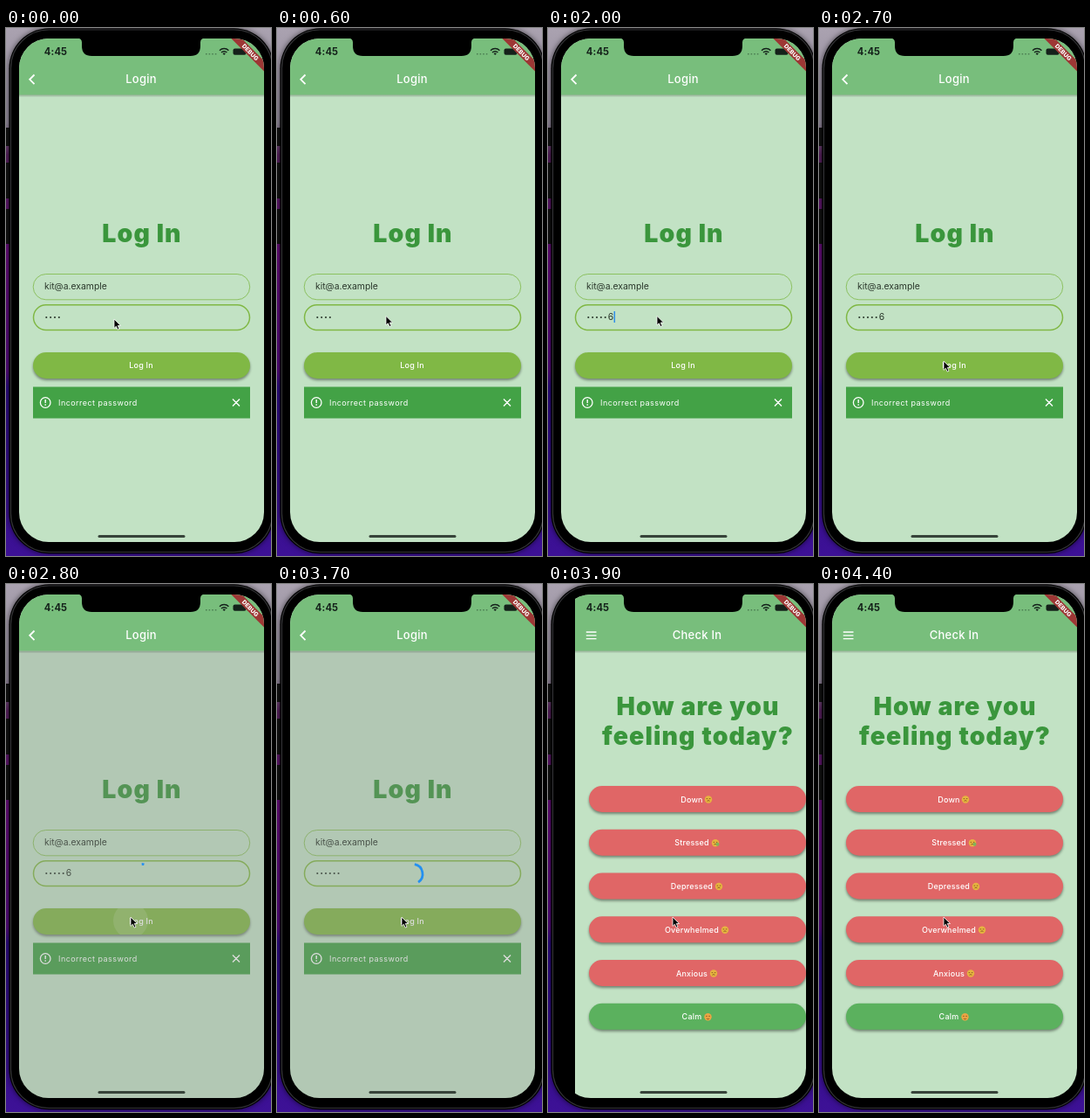
An HTML page that plays this animation: 304 px wide and 604 px high, repeating every 4500 ms.

```html
<!DOCTYPE html>
<html lang="en">
<head>
<meta charset="utf-8">
<title>Log in and check in</title>
<style>
html, body { margin: 0; width: 100%; height: 100%; overflow: hidden; background: #000; }
svg { display: block; width: 304px; height: 604px; font-family: Inter, Roboto, sans-serif; font-optical-sizing: none; }
.mid { text-anchor: middle; }
.white { fill: #fff; }
.line { fill: none; stroke: #fff; }
.bar { font-size: 13px; font-weight: 500; letter-spacing: .25px; }
.label { font-size: 9px; font-weight: 500; letter-spacing: .2px; }
.title { font-size: 28.5px; font-weight: 900; letter-spacing: 1.1px; fill: #3a963c; }
.input { font-size: 10.4px; fill: #2b382c; }
.lift { filter: drop-shadow(0 2px 1.8px rgba(0, 0, 0, .42)); }
.phone { filter: drop-shadow(0 0 3px rgba(0, 0, 0, .6)); }
</style>
</head>
<body>
<svg viewBox="0 0 304 604">
  <defs>
    <linearGradient id="wall" x2="0" y2="1">
      <stop offset="0" stop-color="#aaa2b0"/>
      <stop offset=".18" stop-color="#8f8798"/>
      <stop offset=".24" stop-color="#55205c"/>
      <stop offset=".42" stop-color="#640c78"/>
      <stop offset=".65" stop-color="#520a7c"/>
      <stop offset=".68" stop-color="#2c0b80"/>
      <stop offset="1" stop-color="#3d1196"/>
    </linearGradient>
    <linearGradient id="shade" x2="0" y2="1">
      <stop offset="0" stop-opacity=".22"/>
      <stop offset="1" stop-opacity="0"/>
    </linearGradient>
    <clipPath id="screen"><rect x="15" y="12" width="281" height="576" rx="34"/></clipPath>
    <clipPath id="pill"><rect x="31" y="371" width="249" height="30" rx="15"/></clipPath>
  </defs>

  <rect width="304" height="604" fill="url(#wall)"/>
  <path d="M0 114h4v21H0zM0 154h4v41H0zM0 207h4v40H0z" fill="#111"/>
  <rect class="phone" x="3.5" y=".3" width="304" height="601" rx="46"/>
  <rect x="5.5" y="2" width="300" height="597.5" rx="44" stroke="#333336" stroke-width="1.2"/>

  <g clip-path="url(#screen)">
    <g id="login">
      <rect x="15" y="12" width="281" height="576" fill="#c2e2c4"/>
      <text class="title mid" x="156" y="245">Log In</text>
      <rect x="31.2" y="281.5" width="248.5" height="29.3" rx="14.6" fill="none" stroke="#8cc160"/>
      <text class="input" x="44" y="299">kit@a.example</text>
      <rect x="31.5" y="316.7" width="248" height="28.8" rx="14.4" fill="none" stroke="#80b845" stroke-width="1.5"/>
      <g id="dots" fill="#2b382c"></g>
      <text class="input" id="digit" y="334"></text>
      <rect id="caret" y="324" width="1.5" height="13" fill="#2f8fe8"/>
      <rect class="lift" x="31" y="371" width="249" height="30" rx="15" fill="#80b845"/>
      <g clip-path="url(#pill)"><circle id="ripple" cx="143" cy="385" fill="#fff"/></g>
      <text class="label mid white" x="155" y="388.5">Log In</text>
      <rect x="31" y="410.5" width="249" height="36" fill="#43a246"/>
      <circle class="line" cx="45.2" cy="428.5" r="5.8" stroke-width="1.3"/>
      <path class="line" stroke-width="1.4" d="M45.2 425v4M45.2 430.2v1.5M260 424.5l8 8m0-8l-8 8"/>
      <text class="white" x="60" y="431.5" font-size="9" letter-spacing=".46">Incorrect password</text>
      <rect id="dim" x="15" y="77" width="281" height="511" fill="#8e8e8e" opacity=".31"/>
      <path id="spinner" fill="none" stroke="#2490f0" stroke-width="2.8"/>
      <g class="header">
        <path class="line" d="M32.5 53.5l-5.3 5.3 5.3 5.3" stroke-width="1.8"/>
        <text class="bar mid white" x="155" y="63.3">Login</text>
      </g>
    </g>

    <g id="checkin">
      <rect x="15" y="12" width="281" height="576" fill="#c2e2c4"/>
      <g class="title mid">
        <text x="156" y="150.3">How are you</text>
        <text x="156" y="184">feeling today?</text>
      </g>
      <g id="moods"></g>
      <g class="header">
        <path class="line" d="M27.8 55h11.7m-11.7 3.800h11.7m-11.7 3.800h11.7" stroke-width="1.3"/>
        <text class="bar mid white" x="155" y="63.3">Check In</text>
      </g>
    </g>

    <text x="43.8" y="31" font-size="11.2" font-weight="700" letter-spacing=".15" fill="#14211a">4:45</text>
    <g fill="#14211a">
      <path d="M229 29.8h1.6m2 0h1.6m2 0h1.6m2 0h1.6" stroke="#4d8053" stroke-width="1.4"/>
      <path d="M245 25.8a7.3 7.3 0 0 1 10.4 0M247 28a4.5 4.5 0 0 1 6.4 0" fill="none" stroke="#14211a" stroke-width="1.5"/>
      <path d="M248.5 29.2a2.5 2.5 0 0 1 3.4 0l-1.7 1.9z"/>
      <rect x="260.5" y="23.5" width="15" height="7.3" rx="2"/>
    </g>
    <g transform="translate(296 12) rotate(45)">
      <rect x="-29" y="18" width="58" height="8.6" fill="#9d3735"/>
      <text class="mid white" y="24.7" font-size="6.8" font-weight="800">DEBUG</text>
    </g>
    <rect x="105.5" y="580" width="100" height="3" rx="1.5" fill="#37443a"/>
  </g>
  <path d="M82 11.5q5 .5 5 5v4q0 11.5 11.5 11.5h113q11.5 0 11.5-11.5v-4q0-4.5 5-5z"/>
  <path id="mouse" d="M0 0v10.4l2.4-2.2 1.7 3.9 1.9-.8-1.7-3.8h3.3z" stroke="#fff" stroke-width=".8"/>
</svg>
<script>
const LOOP = 4500, STEP = 100;
const $ = id => document.getElementById(id);
const set = (id, attrs) => {
  for (const key in attrs) $(id).setAttribute(key, attrs[key]);
};
const clamp = v => Math.min(1, Math.max(0, v));

// Cubic easing solved by bisection
const bezier = (x1, y1, x2, y2) => x => {
  const at = (s, a, b) => 3 * s * (1 - s) ** 2 * a + 3 * s * s * (1 - s) * b + s ** 3;
  let lo = 0, hi = 1;
  for (let i = 0; i < 24; i++) {
    const s = (lo + hi) / 2;
    if (at(s, x1, x2) < x) lo = s; else hi = s;
  }
  return at(lo, y1, y2);
};
const arcEase = bezier(.4, 0, .2, 1);
const pageEase = bezier(.35, .91, .33, .97);

// Linear interpolation over [time, value...] keys
const track = (keys, t) => {
  const i = keys.findIndex(k => k[0] > t);
  if (i < 0) return keys[keys.length - 1].slice(1);
  const a = keys[i - 1], b = keys[i], p = (t - a[0]) / (b[0] - a[0]);
  return a.slice(1).map((v, j) => v + (b[j + 1] - v) * p);
};

for (const header of document.querySelectorAll('.header'))
  header.insertAdjacentHTML('afterbegin',
    '<rect x="15" y="12" width="281" height="64.5" fill="#78be7c"/>' +
    '<rect x="15" y="76.5" width="281" height="3" fill="url(#shade)"/>');

const moods = [['Down', 168], ['Stressed', 176], ['Depressed', 180],
  ['Overwhelmed', 187], ['Anxious', 174], ['Calm', 167.5]];
$('moods').innerHTML = moods.map(([name, x], i) => {
  const y = 231 + i * 49.75, calm = name === 'Calm';
  const bend = calm ? 1.6 : -1.4;
  const extra = name === 'Stressed' ? `<circle cx="${x + 2.5}" cy="${y + 17}" r="2" fill="#7fb35a"/>` : '';
  return `<rect class="lift" x="31" y="${y}" width="249" height="30" rx="15" fill="${calm ? '#5bb15e' : '#e06666'}"/>
    <text class="label mid white" x="149" y="${y + 18.7}">${name}</text>
    <circle cx="${x}" cy="${y + 15.5}" r="4.2" fill="${calm ? '#eba544' : '#e6b440'}"/>
    <path d="M${x - 2.4} ${y + 14.6}h1.6m1.6 0h1.6M${x - 1.5} ${y + 17.3}q1.5 ${bend} 3 0" fill="none" stroke="#7a4a1c" stroke-width=".8"/>${extra}`;
}).join('');

const mousePath = [[0, 124, 333], [100, 124, 333], [400, 125, 329.5], [2100, 125, 329.5],
  [2300, 133, 352], [2500, 143, 381]];

function drawPassword(t) {
  const typed = t < 1400 ? 4 : t < 1600 ? 5 : 6;
  const shown = typed > 4 && t < 3000;
  const count = typed - shown;
  $('dots').innerHTML = Array.from({ length: count },
    (_, i) => `<circle cx="${46.3 + i * 4.85}" cy="331" r="1.05"/>`).join('');
  $('digit').textContent = shown ? typed : '';
  const end = 44.5 + count * 4.85;
  set('digit', { x: end });
  const [alpha] = track([[0, 0], [600, 0], [800, 1], [2100, 1], [2300, 0]], t);
  set('caret', { x: end + (shown ? 6.8 : -.6), opacity: alpha });
}

function drawSpinner(t) {
  const cycle = t / 1333 % 1;
  const head = 270 * arcEase(clamp(cycle * 2));
  const tail = 270 * arcEase(clamp(cycle * 2 - 1));
  const from = -90 + tail + t * .262;
  const point = deg => {
    const a = deg * Math.PI / 180;
    return `${155.7 + 11.3 * Math.cos(a)} ${331.7 + 11.3 * Math.sin(a)}`;
  };
  const sweep = Math.max(head - tail, 14);
  set('spinner', { d: `M${point(from)}A11.3 11.3 0 ${+(sweep > 180)} 1 ${point(from + sweep)}` });
}

function draw(t) {
  const busy = t >= 2800, done = t >= 3800;
  drawPassword(t);
  drawSpinner(Math.max(0, t - 2800));
  for (const id of ['dim', 'spinner']) $(id).style.display = busy ? '' : 'none';
  $('login').style.display = done ? 'none' : '';
  $('checkin').style.display = done ? '' : 'none';
  set('checkin', { transform: `translate(${281 * (1 - pageEase(clamp((t - 3700) / 360)))} 0)` });

  const press = Math.max(0, t - 2800);
  set('ripple', {
    r: 20 + press * .12,
    opacity: busy ? .14 * clamp(1 - press / 200) : 0
  });
  set('mouse', { transform: `translate(${track(mousePath, t)})` });
}

function tick() {
  draw(Math.floor(performance.now() % LOOP / STEP) * STEP);
  requestAnimationFrame(tick);
}
tick();
</script>
</body>
</html>
```
